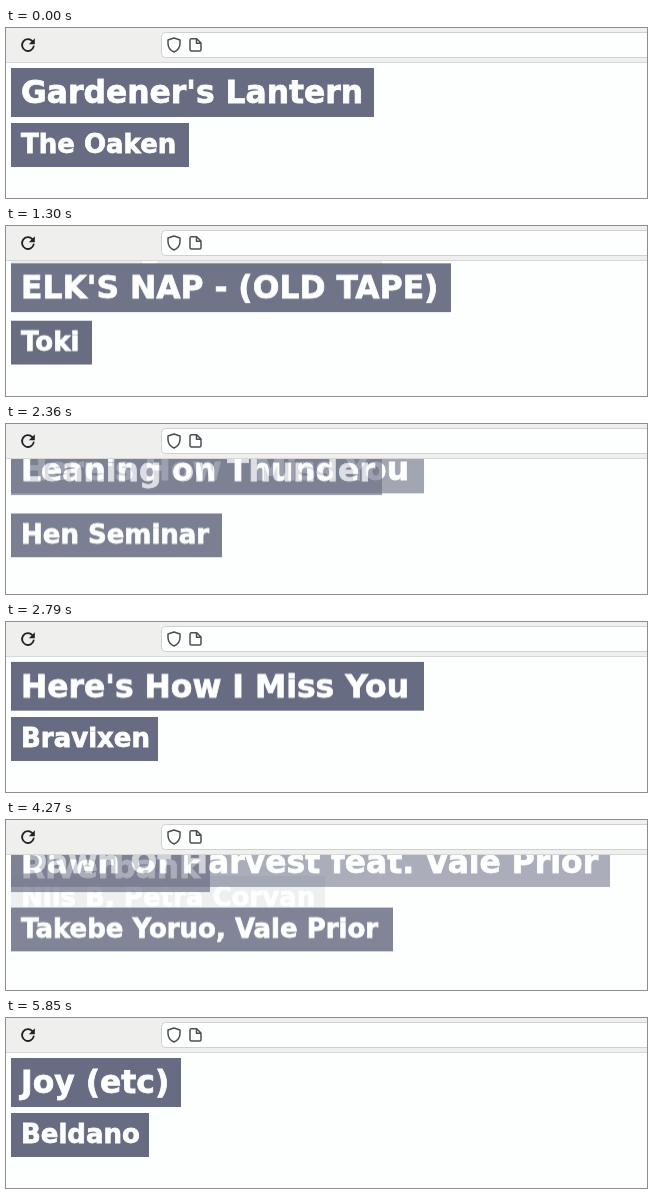
An HTML page for the animation above (5880 ms loop, 641 by 170 pixels).

```html
<!DOCTYPE html>
<html lang="en">
<head>
<meta charset="utf-8">
<title>Now playing</title>
<style>
  html, body { margin: 0; width: 100%; height: 100%; overflow: hidden; background: #fdfefe; }
  #stage { position: relative; width: 641px; height: 170px; overflow: hidden; background: #fdfefe; }
  .line {
    position: absolute; left: 5px; box-sizing: border-box; padding-left: 10px;
    background: #686c82; color: #fdfefe; white-space: pre;
    font-family: "DejaVu Sans", Verdana, sans-serif; font-weight: 700;
    -webkit-text-stroke: .8px #fdfefe;
    will-change: transform, opacity;
  }
  .title { top: 40px; height: 49px; line-height: 49px; font-size: 31.4px; }
  .artist { top: 94.5px; height: 43.5px; line-height: 43px; font-size: 26px; }
  #bar { position: absolute; left: 0; top: 0; }
</style>
</head>
<body>
<div id="stage">
  <div id="lines"></div>
  <svg id="bar" width="641" height="35" fill="none" stroke-linejoin="round">
    <rect width="641" height="34" fill="#eff0ee"/>
    <rect y="34" width="641" height="1" fill="#d6d7d6"/>
    <rect x="155.5" y="4.5" width="500" height="25" rx="4" fill="#fdfefe" stroke="#cfd0cf"/>
    <g stroke="#222226" stroke-width="1.8">
      <path d="M26.300 13.100A5.900 5.900 0 1 0 27.700 18.400" stroke-linecap="round"/>
      <path d="M28.800 10.200V16.200H22.800Z" fill="#222226" stroke="none"/>
    </g>
    <g stroke="#4c4d52" stroke-width="1.500">
      <path d="M168 10L174 12V15.500C174 19.500 171.500 22.500 168 24C164.500 22.500 162 19.500 162 15.500V12Z"/>
      <path d="M185.500 10.700H190.700L195 15V21.500Q195 23 193.500 23H185.500Q184 23 184 21.500V12.200Q184 10.700 185.500 10.700ZM190.500 11V15.200H194.700"/>
    </g>
  </svg>
</div>
<script>
const LOOP = 5880;

// title, title box width, artist, artist box width, time the song comes in
const songs = [
  ["Gardener's Lantern", 363, "The Oaken", 177.5, null],
  ["ELK'S NAP - (OLD TAPE)", 440, "Toki", 81, 65],
  ["Leaning on Thunder", 371, "Hen Seminar", 211, 1125],
  ["Here's How I Miss You", 413, "Bravixen", 147, 2030],
  ["Dawn Of Harvest feat. Vale Prior", 599, "Takebe Yoruo, Vale Prior", 382, 3000],
  ["Riverbank", 199, "Nils B, Petra Corvan", 314, 3915],
  ["Joy (etc)", 170, "Beldano", 137.5, 4840]
];

// delay and length of each move after a song change
const timing = {
  title:  { out: [0, 465],  in: [145, 700] },
  artist: { out: [90, 480], in: [340, 450] }
};

const clamp = x => Math.min(1, Math.max(0, x));
const cubicOut = x => 1 - (1 - x) ** 3;
const progress = (t, start, [delay, length]) => clamp((t - start - delay) / length);

const holder = document.getElementById("lines");
const lines = [];

function addLine(kind, text, width, start, end) {
  const el = document.createElement("div");
  el.className = "line " + kind;
  el.textContent = text;
  el.style.width = width + "px";
  holder.prepend(el); // leaving lines stay above arriving ones
  lines.push({ el, start, end, ...timing[kind] });
}

songs.forEach(([title, titleWidth, artist, artistWidth, start], i) => {
  const end = i + 1 < songs.length ? songs[i + 1][4] : null;
  addLine("title", title, titleWidth, start, end);
  addLine("artist", artist, artistWidth, start, end);
});

// a hidden line sits exactly its own height above its place
function draw(t) {
  for (const line of lines) {
    const shown = line.start === null ? 1 : cubicOut(progress(t, line.start, line.in));
    const kept = line.end === null ? 1 : cubicOut(1 - progress(t, line.end, line.out));
    const level = Math.min(shown, kept);
    line.el.style.opacity = level;
    line.el.style.transform = `translateY(${(level - 1) * 100}%)`;
  }
}

const origin = performance.now();
function tick() {
  draw((performance.now() - origin) % LOOP);
  requestAnimationFrame(tick);
}
draw(0);
requestAnimationFrame(tick);
</script>
</body>
</html>
```
